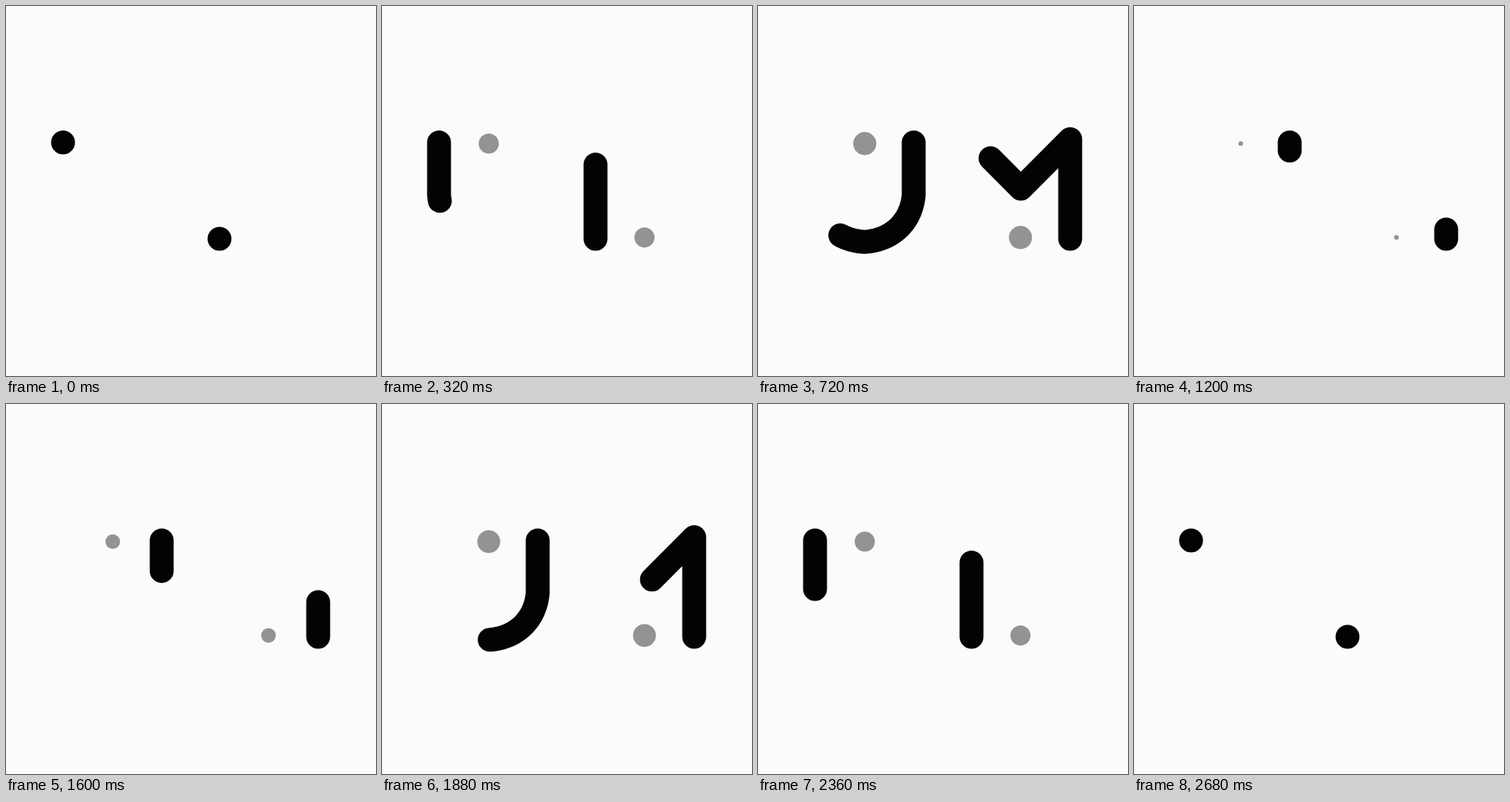
An HTML page with a canvas for the animation above (2800 ms loop, 480 by 480 pixels).

```html
<!DOCTYPE html>
<html lang="en">
<head>
<meta charset="utf-8">
<title>Two-letter loader</title>
<style>
  html, body { margin: 0; width: 100%; height: 100%; overflow: hidden; background: #fbfbfb; }
  canvas { display: block; }
</style>
</head>
<body>
<canvas id="stage" width="480" height="480"></canvas>
<script>
const ctx = document.getElementById('stage').getContext('2d');
const LOOP = 2800, STEP = 40;
const INK = '#030303', GRAY = '#939393', PAPER = '#fbfbfb';
const clamp = v => Math.min(1, Math.max(0, v));
const ramp = (t, from, to) => clamp((t - from) / (to - from));

function cubic(a, b, c, d, steps = 32) {
  return Array.from({ length: steps }, (_, i) => {
    const t = (i + 1) / steps, s = 1 - t;
    return [0, 1].map(k =>
      s * s * s * a[k] + 3 * s * s * t * b[k] + 3 * s * t * t * c[k] + t * t * t * d[k]);
  });
}

// Left half of the bowl; the right half is its reflection about x = 138.
const leftBowl = [[74, 177], [74, 245],
  ...cubic([74, 245], [77, 280], [102, 304], [138, 306])];
const rightBowl = leftBowl.slice(0, -1).reverse().map(([x, y]) => [276 - x, y]);

// head: stroke end accelerates; tail: stroke start follows and slows down.
const letters = [
  { points: [...leftBowl, ...rightBowl], turn: 1326,
    head: 668, tail: [558, 1400], power: 2.4 },
  { points: [[277, 302], [277, 172.7], [341, 237], [405, 172.7], [405, 302]], turn: 1340,
    head: 684, tail: [563, 1333], power: 2.05 }
];

for (const letter of letters) {
  letter.marks = [0];
  letter.points.forEach((p, i, all) => {
    if (i) letter.marks.push(letter.marks[i - 1] + Math.hypot(p[0] - all[i - 1][0], p[1] - all[i - 1][1]));
  });
  letter.length = letter.marks[letter.marks.length - 1];
}

function pointAt({ points, marks }, distance) {
  let i = 1;
  while (i < marks.length - 1 && marks[i] < distance) i++;
  const k = clamp((distance - marks[i - 1]) / (marks[i] - marks[i - 1]));
  return [0, 1].map(n => points[i - 1][n] + (points[i][n] - points[i - 1][n]) * k);
}

function disc(x, y, r, color) {
  ctx.fillStyle = color;
  ctx.beginPath();
  ctx.arc(x, y, r, 0, Math.PI * 2);
  ctx.fill();
}

function drawLetter(letter, t) {
  const phase = t < letter.turn ? t : 2 * letter.turn - t;
  const from = letter.length * (1 - (1 - ramp(phase, ...letter.tail)) ** letter.power);
  const to = letter.length * ramp(phase, 0, letter.head) ** 2;
  const start = pointAt(letter, from);
  if (to - from < 0.05) {
    disc(...start, 15.5, INK);
    return;
  }
  ctx.beginPath();
  ctx.moveTo(...start);
  letter.points.forEach((p, i) => {
    if (letter.marks[i] > from && letter.marks[i] < to) ctx.lineTo(...p);
  });
  ctx.lineTo(...pointAt(letter, to));
  ctx.stroke();
}

function dotRadius(t) {
  const p = t % 1400;
  const grow = 1 - (1 - ramp(p, 39, 605)) ** 3;
  const shrink = ramp(p, 675, 1241) ** 3;
  return 15 * grow * (1 - shrink);
}

function draw(t) {
  ctx.fillStyle = PAPER;
  ctx.fillRect(0, 0, 480, 480);
  ctx.strokeStyle = INK;
  ctx.lineWidth = 31;
  ctx.lineCap = ctx.lineJoin = 'round';
  letters.forEach(letter => drawLetter(letter, t));
  const r = dotRadius(t);
  if (r > 0) {
    disc(138.5, 178.5, r, GRAY);
    disc(340.5, 300.3, r, GRAY);
  }
}

const began = performance.now();
function tick() {
  const t = (performance.now() - began) % LOOP;
  draw(Math.floor(t / STEP) * STEP);
  requestAnimationFrame(tick);
}
tick();
</script>
</body>
</html>
```
